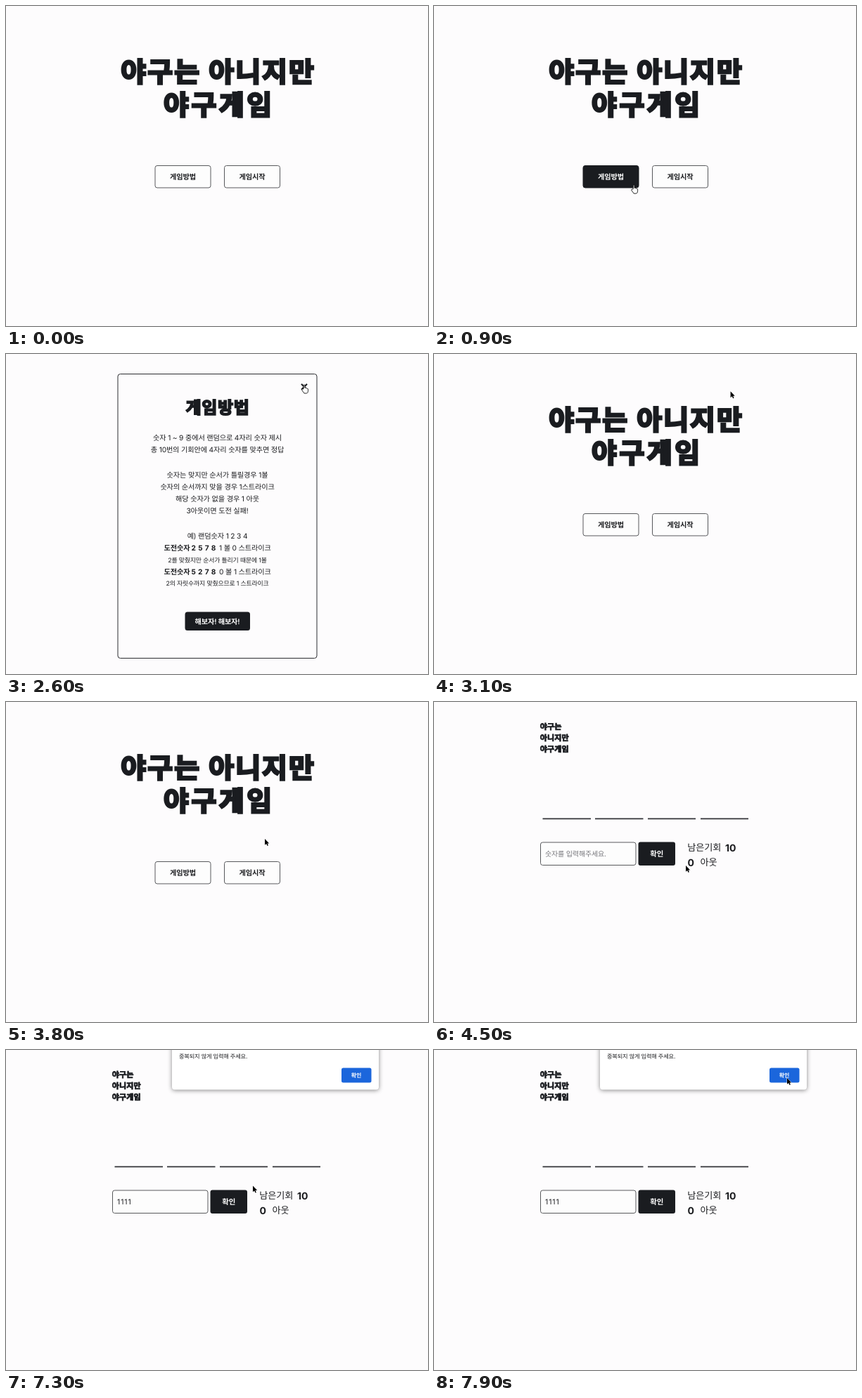
Recreate the animation shown at these times as an HTML page. Size 600 px wide and 456 px high, loop 8 s.

```html
<!DOCTYPE html>
<html lang="ko">
<head>
<meta charset="utf-8">
<title>야구는 아니지만 야구게임</title>
<style>
  html, body { margin: 0; width: 100%; height: 100%; overflow: hidden; background: #fdfcfd; }
  svg { display: block; width: 600px; height: 456px; }
  text {
    font-family: Inter, "Noto Sans CJK KR", "Noto Sans KR", "Noto Sans CJK JP", "Noto Sans CJK", sans-serif;
    fill: #1b1c1f; letter-spacing: -.16px; text-rendering: geometricPrecision; white-space: pre;
  }
  .black {
    font-family: "Noto Sans CJK KR", "Noto Sans KR", "Noto Sans CJK JP", "Noto Sans CJK", sans-serif;
    font-weight: 900; fill: #1a1c20; stroke: #1a1c20;
  }
  .title { stroke-width: 2.8px; letter-spacing: 2.1px; word-spacing: -2px; }
  .title.second { letter-spacing: 3.5px; }
  .head { stroke-width: 1.8px; letter-spacing: .7px; }
  .logo { stroke-width: .8px; letter-spacing: .1px; }
  .mid { text-anchor: middle; }
  .bold { font-weight: 700; }
  .semi { font-weight: 600; }
  .light { fill: #fff; }
  .hint { fill: #75757a; letter-spacing: -.15px; }
  .guess { letter-spacing: .4px; }
  .typed { letter-spacing: .9px; }
  .outline { fill: #fdfdfd; stroke: #58595c; }
  .dark { fill: #1a1c20; }
  .hover rect { fill: #1a1c20; stroke: #1a1c20; }
  .hover text { fill: #fff; }
  #field.focus { stroke: #2566b8; stroke-width: 1.7px; }
</style>
</head>
<body>
<svg viewBox="0 0 600 456">
  <g id="home">
    <g id="howTo"><rect class="outline" x="212" y="227.5" width="79" height="31.5" rx="3"/></g>
    <g id="start"><rect class="outline" x="310.5" y="227.5" width="79" height="31.5" rx="3"/></g>
  </g>

  <g id="modal">
    <rect x="159" y="28.5" width="283" height="405" rx="3.5" fill="#fdfcfd" stroke="#2b2c30"/>
    <path d="M420 42.7l8 8m0-8l-8 8" stroke="#1a1c20" stroke-width="2.1"/>
    <rect class="dark" x="254.5" y="367.5" width="92.5" height="26.5" rx="3.5"/>
  </g>

  <g id="game">
    <path d="M154.5 166.4h68.5m6 0h68.5m6.5 0h68m7 0h68" stroke="#333438" stroke-width="1.8"/>
    <rect id="field" class="outline" x="151.5" y="200" width="135.5" height="32.5" rx="3"/>
    <rect class="dark" x="290.5" y="199.5" width="52.5" height="33.5" rx="3"/>
    <rect id="caret" y="210" width=".9" height="12.5" fill="#1b1c1f"/>
  </g>

  <g id="alert">
    <rect x="236" y="-40" width="294" height="96.5" rx="4" fill="#fff"
      style="filter:drop-shadow(0 1px 3px #0007)"/>
    <rect x="477" y="25.5" width="42.5" height="21" rx="2.5" fill="#1b66dc"/>
  </g>

  <g id="pointer">
    <path id="arrow" transform="scale(.88)" d="M0 0V10L2.4 7.9 4 11.3 5.6 10.6 4.1 7.3H7Z" fill="#000"
      stroke="#fff" stroke-width=".9" paint-order="stroke"/>
    <path id="hand" transform="scale(.9)" fill="#fff" stroke="#111" stroke-width="1"
      d="M-1 3V-2.5a1 1 0 0 1 2 0V1.2q1.6-.5 1.9.6 1.5-.3 1.8.7 1.4-.2 1.4 1.2V6q0 3-2 4H0Q-1.5 8-3.7 4.8q-.4-1.6 1-1.4Z"/>
    <path id="beam" d="M-2.5-7.5q2.5 0 2.5 1.5 0-1.5 2.5-1.5M0-6V6M-2.5 7.5q2.5 0 2.5-1.5 0 1.5 2.5 1.5"
      fill="none" stroke="#222" stroke-width="1"/>
  </g>
</svg>
<script>
const $ = id => document.getElementById(id);

// Places a line of text by its vertical centre.
function label(parent, x, cy, size, str, cls = '') {
  const el = document.createElementNS('http://www.w3.org/2000/svg', 'text');
  el.setAttribute('x', x);
  el.setAttribute('y', cy + size * 0.375);
  el.setAttribute('font-size', size);
  el.setAttribute('class', cls);
  el.textContent = str;
  $(parent).append(el);
  return el;
}

label('home', 163.2, 93.8, 39, '야구는 아니지만', 'black title');
label('home', 224, 140.7, 39, '야구게임', 'black title second');
label('howTo', 251.5, 243.3, 10.2, '게임방법', 'mid bold');
label('start', 350, 243.3, 10.2, '게임시작', 'mid bold');

label('modal', 301, 76, 24, '게임방법', 'black head mid');
const rules = [
  [119, '숫자 1 ~ 9 중에서 랜덤으로 4자리 숫자 제시'],
  [136, '총 10번의 기회안에 4자리 숫자를 맞추면 정답'],
  [172.3, '숫자는 맞지만 순서가 틀릴경우 1볼'],
  [189, '숫자의 순서까지 맞을 경우 1스트라이크'],
  [206, '해당 숫자가 없을 경우 1 아웃'],
  [223, '3아웃이면 도전 실패!'],
  [259, '예) 랜덤숫자 1 2 3 4'],
  [293.3, '2를 맞췄지만 순서가 틀리기 때문에 1볼', 8.9],
  [327, '2의 자릿수까지 맞췄으므로 1 스트라이크', 8.9]
];
for (const [cy, str, size = 10.2] of rules) label('modal', 300.5, cy, size, str, 'mid');
for (const [cy, guess, result] of [
  [276, '2 5 7 8', '1 볼 0 스트라이크'],
  [309.8, '5 2 7 8', '0 볼 1 스트라이크']
]) {
  label('modal', 224.5, cy, 10.2, '도전숫자', 'bold');
  label('modal', 263.5, cy, 10.2, guess, 'bold guess');
  label('modal', 303, cy, 10.2, result);
}
label('modal', 300.5, 380.8, 10.2, '해보자! 해보자!', 'mid semi light');

['야구는', '아니지만', '야구게임'].forEach((str, i) =>
  label('game', 150.8, 35 + i * 15.8, 11, str, 'black logo'));
const hint = label('game', 158, 216.3, 10, '숫자를 입력해주세요.', 'hint');
const typed = label('game', 158, 216.3, 10.4, '', 'typed');
label('game', 316.7, 216.3, 10.4, '확인', 'mid bold light');
label('game', 360.3, 207.3, 13.2, '남은기회');
label('game', 414, 207.3, 14, '10', 'bold');
label('game', 360.6, 228.3, 14, '0', 'bold');
label('game', 378.6, 227.6, 13.2, '아웃');

label('alert', 246, 8.5, 8.2, '중복되지 않게 입력해 주세요.');
label('alert', 498, 36, 8, '확인', 'mid semi light');

const LOOP = 8000, STEP = 100;
const OPEN = 1300, CLOSE = 3100, PLAY = 4400, FOCUS = 5800, ALERT = 7200;
const keyTimes = [6100, 6300, 6500, 6600];

// Pointer stops: time, x, y
const stops = [
  [600, 344, 340], [1000, 273, 243], [1700, 273, 243], [2600, 424, 47],
  [3000, 424, 47], [3800, 368, 195], [4200, 358, 233], [5799, 358, 233],
  [5800, 278.5, 217], [6700, 278.5, 217], [7000, 323, 222],
  [7100, 323, 222], [7900, 502, 40]
];

function pointerAt(t) {
  const i = stops.findIndex(s => s[0] > t);
  if (i < 0) return stops[stops.length - 1].slice(1);
  const [t0, x0, y0] = stops[Math.max(i - 1, 0)], [t1, x1, y1] = stops[i];
  const p = Math.max(0, (t - t0) / (t1 - t0)), k = p * p * (3 - 2 * p);
  return [x0 + (x1 - x0) * k, y0 + (y1 - y0) * k];
}

const show = (el, on) => { el.style.display = on ? '' : 'none'; };
const within = (x, y, l, t, r, b) => x >= l && x <= r && y >= t && y <= b;

function draw(t) {
  const modal = t >= OPEN && t < CLOSE, game = t >= PLAY, home = !game && !modal;
  const focus = t >= FOCUS && t < ALERT, alert = t >= ALERT;
  const visible = t >= 600 && !(t >= keyTimes[0] && t < 6800);
  const [x, y] = pointerAt(t);

  show($('home'), !game);
  show($('modal'), modal);
  show($('game'), game);
  show($('alert'), alert);

  const onHow = home && visible && within(x, y, 212, 228, 291, 259);
  const onStart = home && visible && within(x, y, 310, 228, 390, 259);
  $('howTo').classList.toggle('hover', onHow);
  $('start').classList.toggle('hover', onStart);

  const count = keyTimes.filter(k => t >= k).length;
  typed.textContent = '1'.repeat(count);
  show(hint, !count);
  $('field').classList.toggle('focus', focus);
  show($('caret'), focus && t < 6800);
  $('caret').setAttribute('x', 158 + (game && count ? typed.getComputedTextLength() : 0));

  const beam = game && !alert && within(x, y, 151, 200, 287, 232);
  const hand = onHow || onStart
    || modal && within(x, y, 418, 40, 430, 53)
    || game && !alert && within(x, y, 290, 200, 343, 233);
  show($('pointer'), visible);
  show($('beam'), beam);
  show($('hand'), hand);
  show($('arrow'), !beam && !hand);
  $('pointer').setAttribute('transform', `translate(${x} ${y})`);
}

const begin = performance.now();
function tick() {
  const t = (performance.now() - begin) % LOOP;
  draw(Math.floor(t / STEP) * STEP);
  requestAnimationFrame(tick);
}
tick();
</script>
</body>
</html>
```
